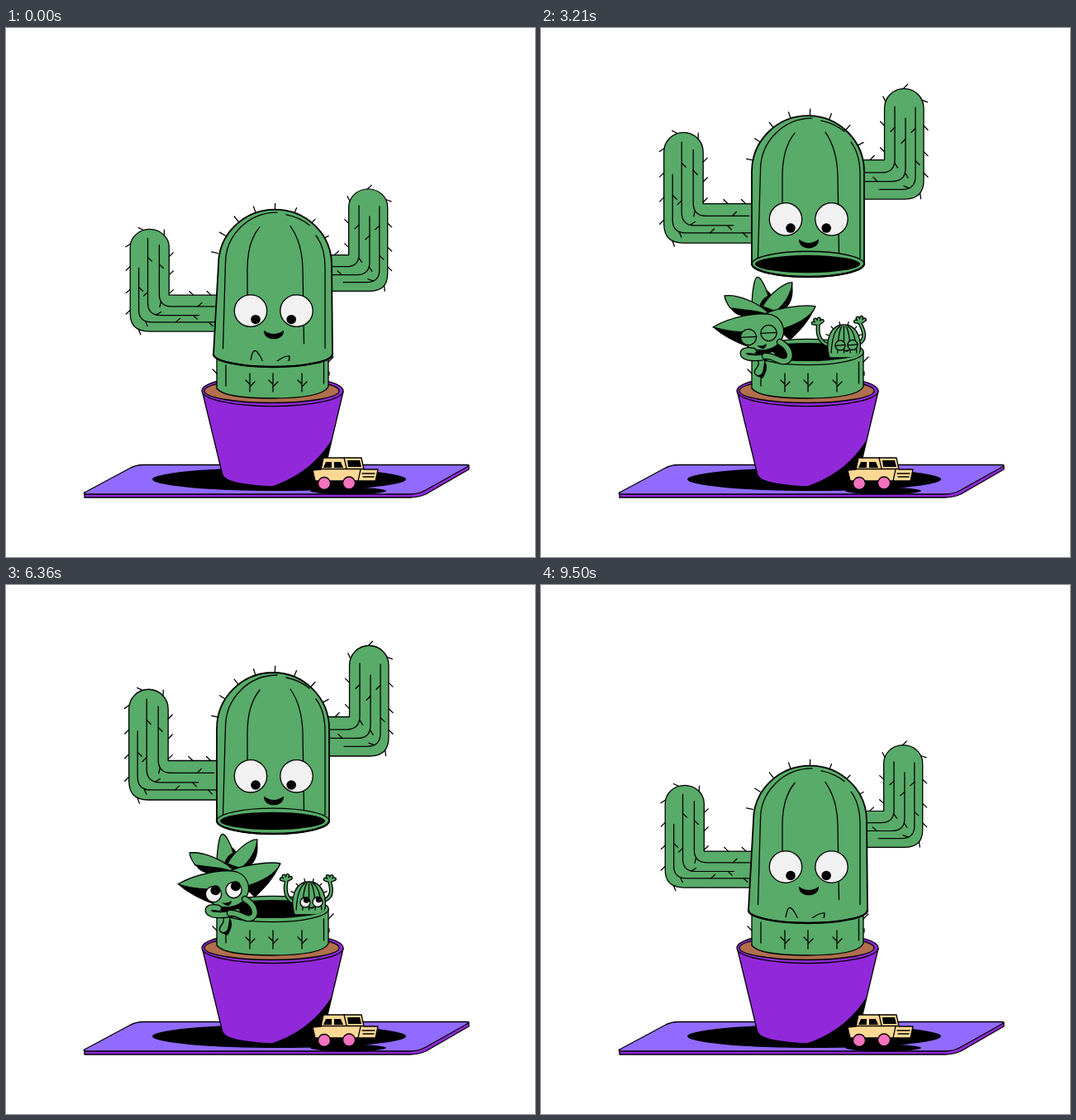
These frames come from a looping animation (640 by 640 pixels, 9570 ms). An HTML page:

```html
<!DOCTYPE html>
<html lang="en">
<head>
<meta charset="utf-8">
<title>Cactus family</title>
<style>
  html, body { margin: 0; width: 100%; height: 100%; overflow: hidden; background: #fff; }
  svg { display: block; width: 100%; height: 100%; }
  g { fill: none; stroke: #000; stroke-width: 1.3; stroke-linecap: round; stroke-linejoin: round; }
  .green { fill: #58ab68; }
  .black { fill: #000; stroke: none; }
  .white { fill: #f1f1f1; }
  .purple { fill: #9129da; }
</style>
</head>
<body>
<svg viewBox="0 0 640 640">
  <defs>
    <clipPath id="hole"><path d="M200 200H450V392H386A63.500 11 0 0 1 259 392H200Z"/></clipPath>
  </defs>

  <g id="pot">
    <path class="purple" d="M95 562V568H489Q499 568 508 564L560 534V529Z"/>
    <path fill="#916bff" d="M95 562L149 533Q157 528.500 166 528.500H557Q562 528.500 557 531.500L508 559Q499 564 489 564H97Q93 564 95 562Z"/>
    <ellipse class="black" cx="330.500" cy="546" rx="153.500" ry="14"/>
    <ellipse class="black" cx="414" cy="560" rx="46" ry="4.200"/>
    <path class="purple" d="M237.500 440L262 541Q266 552 320 555Q378 553 384 541L408 440Z"/>
    <path class="black" d="M394 498Q369 539 320 555Q378 553 384 541Z"/>
    <ellipse class="purple" cx="322.500" cy="439" rx="85.500" ry="18.700"/>
    <ellipse fill="#b16f4d" cx="321.500" cy="439" rx="81.500" ry="14.500"/>
    <path class="green" d="M255 392V436Q264 448 322 448Q382 448 390 434V392Z"/>
    <path d="M266 408V433M384.500 404V430M390 404L396 398M250 413L255 418M391 416V420"/>
    <path id="stems"/>
    <ellipse class="green" cx="322.500" cy="392" rx="67.700" ry="15.700"/>
    <ellipse class="black" cx="322.500" cy="392" rx="63.500" ry="11"/>
  </g>

  <g id="car">
    <path fill="#ffd894" d="M371 535L381 534L384 520H430L433 534H450L447 548H374Z"/>
    <path d="M381 533.500H433M409 520L412 533M429 534L426 548M431 539H446M432 543H445"/>
    <path class="black" d="M387 525H394V532H384ZM397 525H405L408 532H397ZM413 523H428L430 531H414Z"/>
    <circle fill="#f472be" cx="385" cy="551" r="7.500"/>
    <circle fill="#f472be" cx="415" cy="550.500" r="7.500"/>
  </g>

  <g id="armL"></g>
  <g id="armR"></g>

  <g id="cap">
    <path id="capSpines"/>
    <path class="green" id="dome" stroke-width="1.800"/>
    <path d="M262.500 278L265.500 172A62.500 63 0 0 1 328 109M292 213V180Q292 145 307 127M344 126Q358 146 359 178L360.500 272M375 138Q386 152 386 178V278M339 112Q355 115 367 125"/>
    <g id="rim">
      <ellipse class="green" cx="323" cy="285.500" rx="68" ry="15.300"/>
      <ellipse class="black" cx="322.500" cy="285.500" rx="63.500" ry="10.700"/>
    </g>
    <path id="lip" stroke-width="2.400"/>
    <circle class="white" cx="296" cy="231.300" r="19.700"/>
    <circle class="white" cx="351.500" cy="231.300" r="19.700"/>
    <circle class="black" cx="302" cy="242" r="5.800"/>
    <circle class="black" cx="345.200" cy="242" r="5.800"/>
    <path class="black" d="M312 255.500Q324 264.500 336 255.500C337 270 311 270 312 255.500Z"/>
  </g>

  <g clip-path="url(#hole)">
    <g id="kid">
      <g id="kidArms"></g>
      <path id="kidSpines"/>
      <path class="green" d="M349 399C343 378 350 359 366.500 359S390 378 384.500 399Z"/>
      <path id="kidRibs"/>
      <g id="kidEyes"></g>
      <path class="black" d="M365 389Q370 391 374 388Q371 395 365 389Z"/>
    </g>
  </g>

  <g id="agaveBox">
    <g id="agave">
      <path class="black" d="M262 335L273 317Q281 322 280 332L290 342L270 348Z"/>
      <path class="green" d="M255 333C256 318 258 301 262 301.500C266 301 273 316 275 324Q265 330 265 338Z"/>
      <path class="black" d="M304 308C306 324 303 334 294 341L280 343Z"/>
      <path class="green" d="M304 308C294 307 274 325 268 337L284 343C297 332 303 320 304 308Z"/>
      <path class="black" d="M224 329C229 341 235 348 246 349L278 347Z"/>
      <path class="green" d="M222 324C238 322 266 333 278 348C262 341 242 341 229 339Q223 331 222 324Z"/>
      <path class="black" d="M332 337C326 354 310 370 301 378L288 366Z"/>
      <path class="green" d="M332 337C320 334 280 339 268 348L290 365C310 358 327 350 332 337Z"/>
      <path class="black" d="M208 362C220 373 236 381 251 386L250 368Z"/>
      <path class="green" d="M208 362C228 350 262 343 279 347C293 352 298 368 289 380C281 391 262 393 250 385C243 380 241 374 243 368Q224 367 208 362Z"/>
      <path class="black" d="M266 402C274 402 276 412 268 424L261 421Z"/>
      <path class="green" d="M262 401Q271 399 271 404C269 410 271 420 263 421Q255 419 261 411Q265 406 262 401Z"/>
      <g id="agaveArms"></g>
      <g id="agaveEyes"></g>
      <path class="black" d="M261 384Q267 386 273 382Q271 393 261 384Z"/>
    </g>
  </g>
</svg>
<script>
const LOOP = 9570, FPS = 14;
const $ = id => document.getElementById(id);
const mix = (a, b, u) => a + (b - a) * u;

// Smooth 0 to 1 between two times in seconds
function ease(t, from, to) {
  const u = Math.min(1, Math.max(0, (t - from) / (to - from)));
  return u * u * (3 - 2 * u);
}

// Damped swing that starts at s = 0
const ring = (s, period = .66) =>
  s > 0 ? Math.exp(-2.6 * s) * Math.sin(2 * Math.PI * s / period) : 0;

let seed = 7;
const random = () => (seed = seed * 16807 % 2147483647) / 2147483647;

// Slanted spines along a path; side 0 alternates between both sides
function spines(path, gap, side, reach = 1) {
  const end = path.getTotalLength() * reach;
  let d = '', flip = 1;
  for (let s = gap * .6; s < end; s += gap * (.8 + .4 * random())) {
    const p = path.getPointAtLength(s), q = path.getPointAtLength(s + 1);
    const tx = q.x - p.x, ty = q.y - p.y;
    flip = -flip;
    const n = side || flip;
    d += `M${p.x} ${p.y}l${5 * (tx - n * ty)} ${5 * (ty + n * tx)}`;
  }
  return `<path d="${d}"/>`;
}

// Spines standing out from a half ellipse
function halo(cx, cy, rx, ry, from, to, step, size) {
  let d = '';
  for (let deg = from; deg <= to; deg += step) {
    const a = deg * Math.PI / 180, x = Math.cos(a), y = -Math.sin(a);
    d += `M${cx + rx * x} ${cy + ry * y}l${size * x} ${size * y}`;
  }
  return d;
}

// Bent arm from its outer bottom corner; ribs are [inset, top, end]
function buildArm(id, length, ribs) {
  const end = length + 9;
  const shapes = ribs.map(([x, top, to]) => {
    const y = 3.5 + .82 * x;
    return `<path d="M${x} ${-top}V${-y - 16}Q${x} ${-y} ${x + 16} ${-y}H${to}"/>`;
  });
  const g = $(id);
  g.innerHTML = `<path class="green" d="M${end} -47.5H47.5V-110A23.75 23.75 0 0 0 0 -110V-23Q0 0 23 0H${end}"/>` + shapes.join('');
  const [skin, ...lines] = g.children;
  g.innerHTML += spines(skin, 27, 1, .78) + lines.map(l => spines(l, 42, 0)).join('');
}

// Outlined tube: a black stroke under a thinner green one
const tube = (d, w) =>
  `<path d="${d}" stroke-width="${w}"/><path d="${d}" stroke="#58ab68" stroke-width="${w - 2.6}"/>`;

function eyes(list, r, shut) {
  return list.map(([x, y]) => shut
    ? `<circle class="green" cx="${x}" cy="${y}" r="${r}"/><path d="M${x - r} ${y + .5}L${x + r} ${y - .5}"/>`
    : `<circle class="white" cx="${x}" cy="${y}" r="${r}"/>` +
      `<circle class="black" cx="${x + r * .25}" cy="${y - r * .5}" r="${r * .62}"/>`
  ).join('');
}

function wavingArm(x, y, cx, cy, hx, hy, turn) {
  let d = `M${x} ${y}Q${cx} ${cy} ${hx} ${hy + 3}`;
  for (let deg = -75; deg <= 65; deg += 46) {
    const a = (deg + turn) * Math.PI / 180;
    d += `M${hx} ${hy + 1}l${6 * Math.sin(a)} ${-6 * Math.cos(a)}`;
  }
  return tube(d, 5);
}

function drawCap(t) {
  const shut = 1 - ease(t, .43, .75) + ease(t, 9.07, 9.28);
  const swing = 6 * ring(t - 9.28, .4) - (t < 9 ? 42 * ring(t - .7) : 0);
  const windUp = 2 * ease(t, 8.43, 8.57) - 13 * ease(t, 8.64, 9) + 11 * ease(t, 9.07, 9.28);
  const lip = 302 + 109 * shut + swing + windUp;
  const squash = .0024 * Math.max(0, swing);
  const body = 1 - .026 * shut - squash;
  const arm = 1 - .075 * shut - squash;
  const wide = 1 - .009 * shut + squash / 2;

  const place = (id, x, y, dir) => $(id).setAttribute('transform',
    `translate(${320 + (x - 320) * wide} ${y}) scale(${dir * wide} ${arm})`);
  place('armL', 148.7, lip - 42 * body - 3 * shut, 1);
  place('armR', 463, lip - 95 * body, -1);
  $('cap').setAttribute('transform', `translate(0 ${lip - body * 302}) scale(1 ${body})`);

  const l = 255 - 4 * shut, r = 391 + 4 * shut;
  const dl = 255 + 2 * shut, dr = 391 + 3 * shut;
  const rx = (r - l) / 2;
  $('dome').setAttribute('d',
    `M${l} 285L${dl} 174A68 68 0 0 1 ${dr} 174L${r} 285A${rx} 16 0 0 1 ${l} 285Z`);
  $('lip').setAttribute('d', `M${l} 285A${rx} 16 0 0 0 ${r} 285`);
  $('rim').style.display = shut > .5 ? 'none' : '';
}

function drawKids(t) {
  const dive = ease(t, 8.64, 8.86);
  const side = ease(t, 1, 1.2) - ease(t, 8.28, 8.57);
  const bounce = ring(t - 1.1);

  const ax = 39 * (1 - side);
  const ay = 112 * (1 - ease(t, .66, .86) + dive) - 23 * (1 - side) - 11 * bounce;
  const kx = -6 * (1 - ease(t, 1.2, 1.4));
  const ky = 65 * (1 - ease(t, .71, .93) + dive) - 14 * bounce;
  $('agave').setAttribute('transform', `translate(${ax} ${ay})`);
  $('kid').setAttribute('transform', `translate(${kx} ${ky})`);
  $('agaveBox').setAttribute('clip-path', ax > 30 ? 'url(#hole)' : 'none');

  // One blink a second while everyone is out
  const blink = t > 3 && t < 7 && Math.abs(t % 1 - .21) < .1;
  $('agaveEyes').innerHTML = eyes([[251, 374], [275.5, 369]], 9.6, blink);
  $('kidEyes').innerHTML = eyes([[362, 384], [377, 383.5]], 6, blink);

  const w = .5 - .5 * Math.cos((t - 3.25) / .74 * 2 * Math.PI);
  $('kidArms').innerHTML =
    wavingArm(348, 384, mix(333, 340, w), mix(379, 374, w), mix(335, 347, w), mix(357, 355, w), mix(-8, 12, w)) +
    wavingArm(384, 382, mix(396, 400, w), mix(376, 381, w), mix(386, 403, w), mix(355, 361, w), mix(-5, 22, w));
}

function build() {
  buildArm('armL', 106, [[10.5, 83, 105], [21.5, 122, 84], [35.5, 113, 103]]);
  buildArm('armR', 72, [[10, 111, 54], [22, 98, 72], [35, 112, 72]]);
  $('capSpines').setAttribute('d', halo(323, 174, 68, 68, 28, 168, 20, 8));
  $('kidSpines').setAttribute('d', halo(366.5, 379, 19, 20, 20, 160, 28, 4));
  $('stems').setAttribute('d', [295, 323, 358].map(x =>
    `M${x} 418V440M${x - 5} 426l5 5M${x + 6} 428l-6 6`).join(''));

  let ribs = '';
  for (let k = -14; k <= 14; k += 7)
    ribs += `M${366.5 + k * .35} 361Q${366.5 + k} 367 ${366.5 + k * 1.1} 393`;
  $('kidRibs').setAttribute('d', ribs);

  $('agaveArms').innerHTML =
    tube('M257 391C240 387 242 399 255 399Q268 400 280 395', 8.4) +
    tube('M289 380C302 387 303 399 298 402C290 407 283 396 271 397', 8.4);
}

function draw(ms) {
  const step = Math.floor((ms % LOOP + 5) * FPS / 1000);
  const t = step / FPS;
  drawCap(t);
  drawKids(t);
}

build();
const start = performance.now();
(function tick() {
  draw(performance.now() - start);
  requestAnimationFrame(tick);
})();
</script>
</body>
</html>
```
